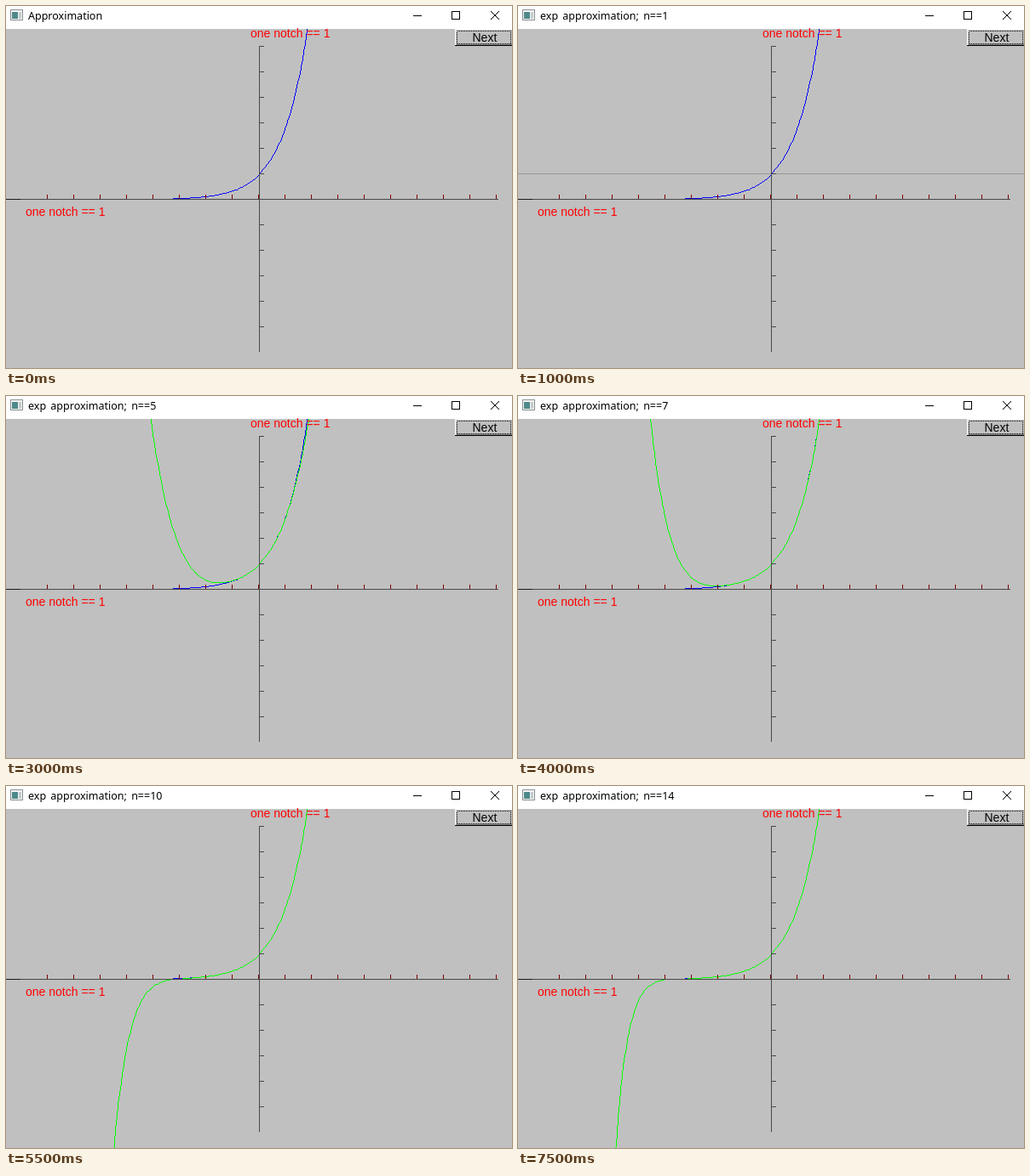
An HTML page with a canvas for the animation above (8 s loop, 594x426 px).

```html
<!DOCTYPE html>
<html lang="en">
<head>
<meta charset="utf-8">
<title>Approximation</title>
<style>
  html, body { margin: 0; width: 594px; height: 426px; overflow: hidden; background: #c0c0c0; }
  canvas, svg { position: absolute; left: 0; top: 0; display: block; }
  text { font: 14px "Liberation Sans", Arial, sans-serif; }
  #title { font: 12.5px "Noto Sans", "Noto Sans CJK KR", sans-serif; word-spacing: 2px; }
</style>
</head>
<body>
<canvas id="plot" width="594" height="426"></canvas>
<svg width="594" height="426" fill="none" shape-rendering="crispEdges">
  <rect width="594" height="27" fill="#fff"/>

  <!-- window icon and buttons -->
  <rect x="5.5" y="4.5" width="14" height="12" fill="#f4f4f4" stroke="#8a8f92"/>
  <rect x="7" y="7" width="7" height="8" fill="#4f8a8b"/>
  <rect x="15" y="7" width="3" height="8" fill="#c4cccc"/>
  <path d="M478 11.5h10M523.5 6.5h9v9h-9z" stroke="#000"/>
  <path d="M569 6l10 10M579 6l-10 10" stroke="#000" shape-rendering="auto"/>
  <text id="title" x="26" y="16" fill="#000">Approximation</text>

  <!-- axes -->
  <path id="ticks" stroke="#800000"/>
  <path id="axes" stroke="#484848"/>
  <text x="287" y="37" fill="#f00">one notch == 1</text>
  <text x="23" y="247" fill="#f00">one notch == 1</text>

  <!-- push button -->
  <rect x="527" y="27" width="67" height="20" fill="#c0c0c0"/>
  <path d="M527.5 46V27.5H594" stroke="#fff"/>
  <path d="M528 45.5H594" stroke="#808080"/>
  <path d="M527 46.5H594" stroke="#000"/>
  <rect x="529.5" y="29.5" width="63" height="15" stroke="#000" stroke-dasharray="1 1"/>
  <text x="547.5" y="42" fill="#000">Next</text>
</svg>
<script>
const W = 594, H = 426, TOP = 27, X0 = 297, Y0 = 227, SCALE = 30;
const R_MIN = -10, R_MAX = 11, POINTS = 400;
const STEP_MS = 500, STEPS = 16;
const ctx = document.getElementById("plot").getContext("2d");
const title = document.getElementById("title");

// 18 notches along x, 12 along y
let ticks = "", axes = "M17 227.5H578M297.5 47V407";
for (let i = 1; i <= 18; i++) ticks += `M${17.5 + 31 * i} 222V227`;
for (let i = 1; i <= 12; i++) axes += `M298 ${407.5 - 30 * i}h5`;
document.getElementById("ticks").setAttribute("d", ticks);
document.getElementById("axes").setAttribute("d", axes);

// Partial sum of the exp series; the factorial wraps at 32 bits.
function expSum(x, n) {
  let sum = 0, fac = 1;
  for (let i = 0; i < n; i++) {
    if (i) fac = Math.imul(fac, i);
    sum += x ** i / fac;
  }
  return sum;
}

function line(x, y, x2, y2) {
  const dx = x2 - x, dy = y2 - y;
  const len = Math.max(Math.abs(dx), Math.abs(dy), 1);
  for (let i = 0; i <= len; i++)
    ctx.fillRect(Math.round(x + dx * i / len), Math.round(y + dy * i / len), 1, 1);
}

function curve(f, color) {
  ctx.fillStyle = color;
  const step = (R_MAX - R_MIN) / POINTS;
  let px, py;
  for (let i = 0; i < POINTS; i++) {
    const r = R_MIN + i * step;
    const x = X0 + Math.trunc(r * SCALE), y = Y0 - Math.trunc(f(r) * SCALE);
    const visible = Math.max(y, py) >= TOP && Math.min(y, py) < H;
    if (i && visible) line(px, py, x, y);
    px = x;
    py = y;
  }
}

let shown = -1;
function draw(now) {
  const step = Math.floor(now / STEP_MS) % STEPS;
  if (step !== shown) {
    shown = step;
    const n = step - 1;
    title.textContent = n < 0 ? "Approximation" : `exp approximation; n==${n}`;
    ctx.fillStyle = "#c0c0c0";
    ctx.fillRect(0, 0, W, H);
    curve(Math.exp, "#00f");
    ctx.fillStyle = "#181818";
    ctx.fillRect(0, Y0, 17, 1);
    if (n >= 0) curve(x => expSum(x, n), n < 2 ? "#969696" : "#0f0");
  }
  requestAnimationFrame(draw);
}
draw(performance.now());
</script>
</body>
</html>
```
